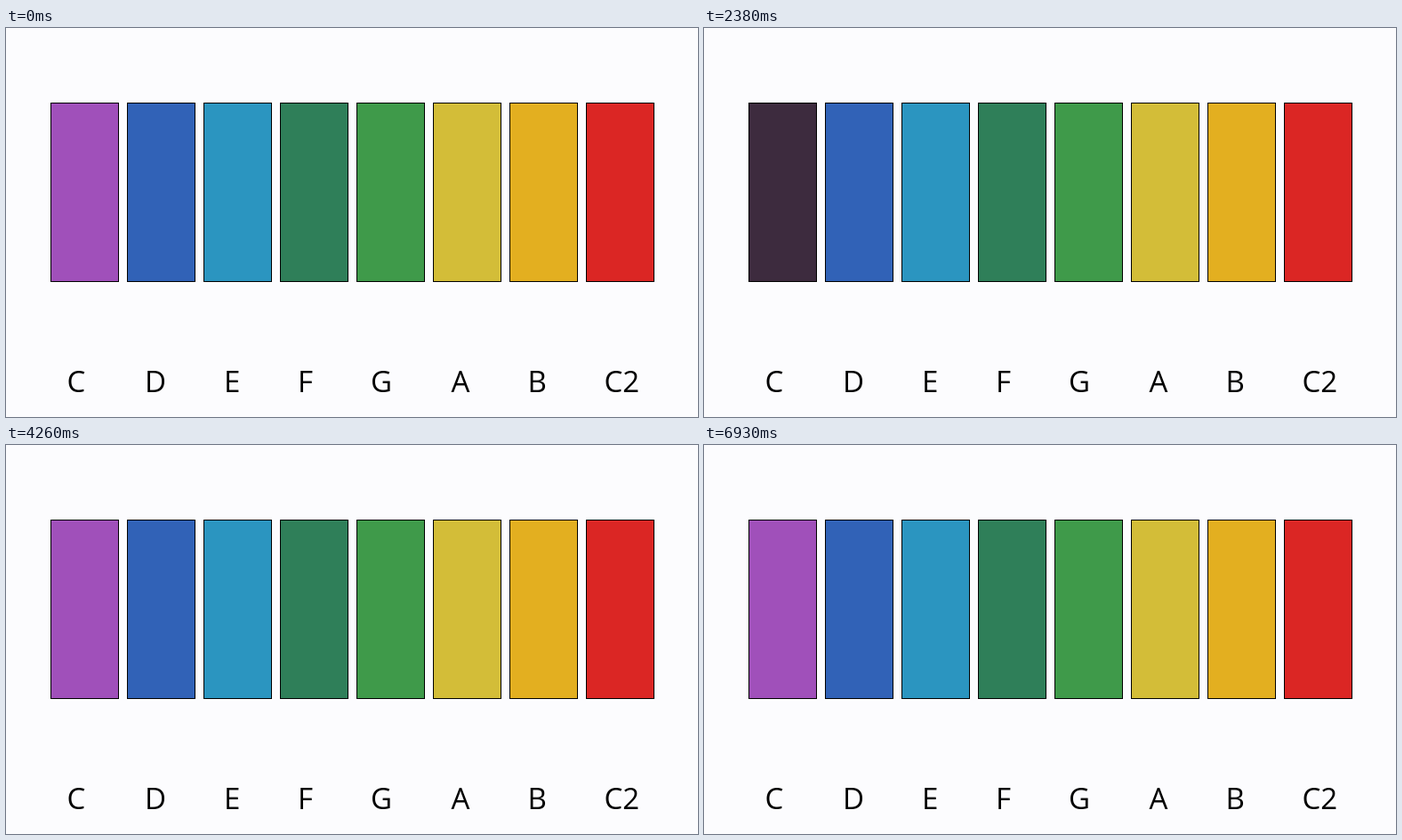
An HTML page that plays this animation: 778x438 px, repeating every 7.02 s.

```html
<!DOCTYPE html>
<html lang="en">
<head>
<meta charset="utf-8">
<title>Colour keys</title>
<style>
  html, body { margin: 0; width: 100%; height: 100%; overflow: hidden; background: #fcfcfe; }
  svg { display: block; width: 778px; height: 438px; }
  rect { stroke: #000; stroke-width: 1; }
  text { font: 33px "Open Sans", "Noto Sans", sans-serif; fill: #000; }
  .low { animation: press-low 7020ms step-end infinite; }
  .mid { animation: press-mid 7020ms step-end infinite; }
  /* Each key switches colour at once while it is held: C twice, then F. */
  @keyframes press-low {
    0%, 43.8%, 60.6% { fill: #a050ba; }
    33.8%, 50.6% { fill: #3d2b3e; }
  }
  @keyframes press-mid {
    0%, 89.8% { fill: #2f7f59; }
    79.8% { fill: #264a38; }
  }
</style>
</head>
<body>
<svg viewBox="0 0 778 438">
  <g>
    <rect class="low" x="50.5" y="84.5" width="76" height="201" fill="#a050ba"/>
    <rect x="136.5" y="84.5" width="76" height="201" fill="#3162b7"/>
    <rect x="222.5" y="84.5" width="76" height="201" fill="#2b95c0"/>
    <rect class="mid" x="308.5" y="84.5" width="76" height="201" fill="#2f7f59"/>
    <rect x="394.5" y="84.5" width="76" height="201" fill="#3f9a4a"/>
    <rect x="480.5" y="84.5" width="76" height="201" fill="#d3bd38"/>
    <rect x="566.5" y="84.5" width="76" height="201" fill="#e3af20"/>
    <rect x="652.5" y="84.5" width="76" height="201" fill="#db2624"/>
  </g>
  <g>
    <text x="68.5" y="410">C</text>
    <text x="156" y="410">D</text>
    <text x="245" y="410">E</text>
    <text x="328" y="410">F</text>
    <text x="410" y="410">G</text>
    <text x="500.5" y="410">A</text>
    <text x="586.5" y="410">B</text>
    <text x="672.5" y="410">C2</text>
  </g>
</svg>
</body>
</html>
```
